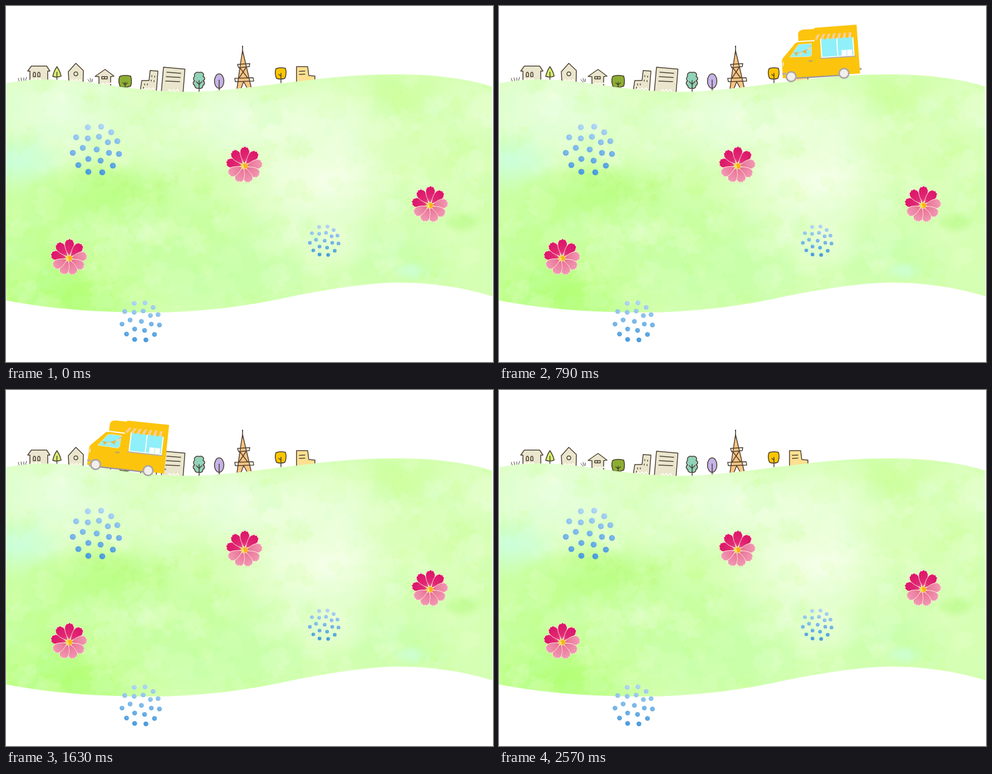
An HTML page with a canvas that plays this animation: 875x640 px, repeating every 2700 ms.

```html
<!DOCTYPE html>
<html lang="en">
<head>
<meta charset="utf-8">
<title>Food truck on the hill</title>
<style>
  html, body { margin: 0; width: 100%; height: 100%; overflow: hidden; background: #fff; }
  canvas { display: block; }
</style>
</head>
<body>
<canvas id="stage" width="875" height="640"></canvas>
<script>
const LOOP = 2700, STEP = 30, SWAY = 390, OFFSET = 10;
const INK = '#4b3d30', WALL = '#e9e6cd', YELLOW = '#fcc40c', SKY = '#8ff0fa';
const stage = document.getElementById('stage');
const view = stage.getContext('2d');
const scene = document.createElement('canvas');
scene.width = 875;
scene.height = 640;
let ctx = scene.getContext('2d');

let seed = 7;
const random = () => (seed = (seed * 16807) % 2147483647) / 2147483647;

function shape(path, fill, stroke, width = 1.5) {
  const p = new Path2D(path);
  if (fill) { ctx.fillStyle = fill; ctx.fill(p); }
  if (stroke) { ctx.strokeStyle = stroke; ctx.lineWidth = width; ctx.stroke(p); }
}
function ellipse(x, y, rx, ry, fill, stroke, width = 1.5) {
  ctx.beginPath();
  ctx.ellipse(x, y, rx, ry, 0, 0, 7);
  if (fill) { ctx.fillStyle = fill; ctx.fill(); }
  if (stroke) { ctx.strokeStyle = stroke; ctx.lineWidth = width; ctx.stroke(); }
}
const ink = (path, fill) => shape(path, fill, INK);

function drawTown() {
  ctx.lineJoin = ctx.lineCap = 'round';
  shape('M22 130l2 6M27 129l1 6M32 129v5M37 128l-2 6M147 132l4 5M151 130l2 6M155 131v5', null, INK, 1);
  // houses
  ink('M43 136V117L39 117 45.5 108 73 108 79 117 75 117V136', WALL);
  ink('M49 127V121q2-4 4 0V127ZM57 127V121q2-4 4 0V127Z');
  ink('M113 138L112 118 125.5 103 139 116 138.5 138', WALL);
  ellipse(125.5, 122, 3.5, 3.5, null, INK);
  ink('M167 143V127L160 126.5 178 114 194 126 188 127V143', WALL);
  ink('M172 127h10v4h-10ZM177 127v4');
  // office blocks
  ink('M241 153L244 134 257 134 259 116 273 117 270 155', WALL);
  shape('M262 125v2M267 126v2M261 133v2M266 134v2M249 140v2M254 140v2M247 146v2', null, INK, 1.4);
  ink('M279 155L283 110 321.5 113.5 318 157', WALL);
  ink('M289 119L314 121M288 127L313 128.5M287 135L312 136');
  ink('M522 136V109L542 109 544 125 555 126 555 134', '#fce090');
  ink('M527 117.5L537 117M527 123L537 122.5');
  // trees
  ink('M91.5 109Q98 119 99 126Q92 129 84 126.5Q86 117 91.5 109Z', '#d3ed70');
  ink('M91.5 119V134');
  ink('M207 125.5Q215 124 224 126Q227 135 224 144Q214 148 205 145Q201 135 204 127Z', '#8bae32');
  ink('M214 148V137M210 138L214 142 218 138');
  ink('M347 119.5c6-2 10 3 7 7c4 2 4 6 0 8c4 2 3 7 0 8c0 5-5 7-7 5c-3 2-8 0-8-5c-3-1-4-6 0-8c-3-2-3-6 0-8c-2-4 2-9 8-7Z', '#91d2ba');
  ink('M347 155V134M342 136L347 141 352 136');
  ellipse(383, 135, 8.5, 13, '#c4b3e8', INK);
  ink('M383 153V133');
  ink('M487 112Q494 110 502 112Q505 121 501 130Q493 133 486 130Q482 121 485 113Z', '#fdc500');
  ink('M494 138V121M490 123L494 126');
  // tower
  ink('M425 80L420 112 415 149H422L427 136 434 149H441L434 118 425 80Z', '#fac581');
  ink('M425 72V86M416 105L438 103.5 437 109 418 111ZM411 130L444 129 445 135 412 136ZM421 112L434 129M431 111L419 129');
  ellipse(425, 73, 1, 1.5, INK);
  // grass tufts at the walls
  for (const [x, y] of [[43, 134], [115, 136], [170, 142], [246, 151], [290, 154]])
    shape(`M${x} ${y}l4 -4 3 4 4 -4 3 4 4 -4 3 4`, null, '#fffff4', 1.5);
}

function wash(x, y, r, color, squash = 1) {
  ctx.save();
  ctx.translate(x, y);
  ctx.scale(1, squash);
  const g = ctx.createRadialGradient(0, 0, 0, 0, 0, r);
  g.addColorStop(0, color);
  g.addColorStop(0.45, color + 'b0');
  g.addColorStop(1, color + '00');
  ctx.fillStyle = g;
  ctx.fillRect(-r, -r, 2 * r, 2 * r);
  ctx.restore();
}

function blotch(x, y, r, color) {
  ctx.beginPath();
  for (let i = 0; i < 18; i++) {
    const a = i * Math.PI / 9, d = r * (0.5 + random() * 0.7);
    ctx.lineTo(x + d * Math.cos(a), y + d * Math.sin(a));
  }
  ctx.fillStyle = color;
  ctx.fill();
}

function drawHill() {
  ctx.save();
  const hill = new Path2D('M1 139C45 130 95 130 160 139S270 154 325 154.5S470 142 545 133S660 123 710 123' +
    'S830 130 873 145L874 522C820 505 760 497 705 497S560 512 500 525S350 551 260 551S80 545 0 529Z');
  ctx.clip(hill);
  ctx.fillStyle = '#d4ffb2';
  ctx.fillRect(0, 0, 875, 640);
  wash(100, 190, 200, '#e6ffdc', 0.6);
  wash(20, 280, 90, '#ccffda', 0.6);
  wash(40, 420, 170, '#c4ff98', 0.8);
  wash(110, 520, 170, '#b2ff76', 0.6);
  wash(180, 345, 150, '#bcff88', 0.5);
  wash(310, 420, 170, '#c6ffa0', 0.6);
  wash(400, 480, 170, '#c6ffa6', 0.5);
  wash(290, 220, 120, '#ddffc4', 0.8);
  wash(430, 200, 150, '#edffe2', 0.6);
  wash(590, 195, 130, '#eaffd8', 0.6);
  wash(560, 310, 160, '#f2ffe4', 0.8);
  wash(720, 165, 110, '#d0ffa4', 0.5);
  wash(835, 185, 100, '#e0ffc4', 0.7);
  wash(760, 270, 130, '#dcffbc', 0.7);
  wash(690, 450, 130, '#cbffac', 0.6);
  wash(580, 420, 90, '#e6ffd2', 0.7);
  wash(830, 450, 100, '#d6ffb4', 0.7);
  wash(730, 475, 40, '#ccffd0', 0.5);
  wash(820, 390, 35, '#bdfb8e', 0.6);
  const tints = ['#ffffff1c', '#b0ff7018', '#c4ffd014', '#f4ffd81a'];
  for (let i = 0; i < 420; i++)
    blotch(random() * 875, 120 + random() * 430, 6 + random() * 28, tints[i % 4]);
  for (let i = 0; i < 30; i++)
    blotch(130 + random() * 180, 300 + random() * 50, 3 + random() * 14, '#a4f06018');
  ctx.restore();
}

const dots = [[147, 218], [171, 217], [189, 227], [126, 236], [147, 238], [167, 235], [183, 245],
  [200, 243], [138, 255], [163, 258], [185, 264], [120, 264], [203, 266], [148, 275], [170, 278],
  [130, 286], [192, 287], [148, 298], [173, 299]];

function drawDots(cx, cy, scale) {
  ctx.save();
  ctx.translate(cx, cy);
  ctx.scale(scale, scale);
  ctx.translate(-162, -258);
  for (const [x, y] of dots) {
    const k = (y - 217) / 82, mix = (a, b) => Math.round(a + (b - a) * k);
    const shade = d => `rgb(${mix(168, 74) + d},${mix(208, 154) + d},${mix(240, 220) + d})`;
    ellipse(x, y, 5.4, 5.2, shade(0));
    ellipse(x + 1.5, y - 1, 3, 3, shade(8));
  }
  ctx.restore();
}

function drawFlower(x, y, angle) {
  ctx.save();
  ctx.translate(x, y);
  ctx.rotate(angle);
  for (let i = 0; i < 9; i++) {
    const turn = (i * 40 - 78) * Math.PI / 180, deep = i < 4;
    ctx.save();
    ctx.rotate(turn);
    ctx.scale(1, 0.95 + 0.06 * Math.cos(turn));
    const g = ctx.createLinearGradient(0, -34, 0, 0);
    g.addColorStop(0, deep ? '#dc1468' : '#f09ab4');
    g.addColorStop(0.6, deep ? '#e02874' : '#ec7c9e');
    g.addColorStop(1, deep ? '#ec6a94' : '#e2628c');
    shape('M0 -4C-4 -10 -9.5 -19 -8 -28L-5 -33 -2.5 -32.5 0 -35 2.5 -33 5 -33.5 8.5 -27C9 -19 4 -10 0 -4Z',
      g, '#fce6d6', 0.9);
    ctx.restore();
  }
  ellipse(0, 0, 6, 5.5, '#ecd95a');
  ellipse(2, 0, 3.8, 4.2, '#fcb414');
  ellipse(-2, 1.5, 1.8, 1.8, '#f7e98a');
  ctx.restore();
}

// time, front wheel x, front wheel y, tilt in degrees
const drive = [[30, 884, 137, 8], [290, 775, 122, 5], [550, 675, 120, 0], [680, 592, 119, -3],
  [790, 525, 127, -3.6], [1180, 337, 152, -7.3], [1400, 250, 149, 2], [1630, 161, 134, 6.6],
  [1900, 25, 130, 0], [2200, -55, 126, 0], [2560, -130, 126, 0]];

function slope(i, c) {
  const a = drive[Math.max(i - 1, 0)], b = drive[Math.min(i + 1, drive.length - 1)];
  return (b[c] - a[c]) / (b[0] - a[0]);
}
function pose(t, c) {
  const i = drive.findIndex(k => k[0] > t) - 1, a = drive[i], b = drive[i + 1];
  const span = b[0] - a[0], u = (t - a[0]) / span, v = 1 - u;
  return a[c] * (1 + 2 * u) * v * v + b[c] * u * u * (3 - 2 * u) +
    span * u * v * (v * slope(i, c) - u * slope(i + 1, c));
}

function drawTruck(x, y, degrees) {
  ctx.save();
  ctx.translate(x, y);
  ctx.rotate(degrees * Math.PI / 180);
  ctx.translate(-675, -120);
  shape('M684 123H765M794 114H802', null, '#9b9799', 3);
  shape('M660 122V97Q659 88 664 84L683 64Q686 59 692 59H721V57H692V46Q692 37 704 37H722V35L798 34 799 122Z', YELLOW);
  // cab
  shape('M675 85L690 65Q691 63 694 63H715L714 82Q713 86 709 86Z', SKY, '#fbe3a4', 1);
  shape('M682 77Q698 82 715 66', null, '#c99a52', 0.8);
  shape('M684 77l6 1-4 6ZM698 76l7-3 0 8Z', '#f5b428');
  shape('M691 78l6-1-1 7ZM706 72l6-4 0 7Z', '#f8d9a0');
  shape('M708 94H715', null, '#aaa08c', 2.2);
  shape('M661 93l2 0 0 6-2 2Z', '#f3ead8');
  shape('M659 114H666', null, '#b5b0b0', 3);
  // serving hatch
  shape('M731 54H791V90H731Z', '#fff');
  shape('M733 54H760V88H733ZM762 54H789V88H762Z', SKY);
  shape('M768 78h9v11h-9ZM778 78h9v11h-9Z', '#fff', '#d8eef0', 0.6);
  shape('M729 90.5H793', null, '#b4b0a8', 2);
  for (let i = 0; i < 14; i++) {
    const left = 722 + i * 5, top = 727 + i * 4.7;
    shape(`M${top} 47H${top + 4.7}L${left + 5} 55q-2.5 4 -5 0Z`, i % 2 ? YELLOW : '#f9cf9c');
  }
  for (const wheel of [675, 770]) {
    ellipse(wheel, 120, 10, 10, '#aaa5a6');
    ellipse(wheel, 120, 7.3, 7.3, '#f1eeec');
  }
  ctx.restore();
}

drawTown();
drawHill();
drawDots(162, 258, 1);
drawDots(572, 422, 0.62);
drawDots(242.5, 567, 0.81);
ctx = view;
ctx.lineJoin = 'round';

function frame() {
  const now = performance.now() % LOOP;
  const t = Math.max(0, Math.floor((now - OFFSET) / STEP) * STEP + OFFSET);
  const swayed = Math.floor(Math.max(0, t - OFFSET) / SWAY) % 2;
  ctx.fillStyle = '#fff';
  ctx.fillRect(0, 0, 875, 640);
  ctx.drawImage(scene, 0, 0);
  for (const [x, y] of [[428, 287.5], [113, 453.5], [761.5, 358.5]])
    drawFlower(x + swayed * 0.7, y + swayed * 0.5, swayed * -0.2);
  if (t >= 30 && t < 2560) drawTruck(pose(t, 1), pose(t, 2), pose(t, 3));
  requestAnimationFrame(frame);
}
frame();
</script>
</body>
</html>
```
